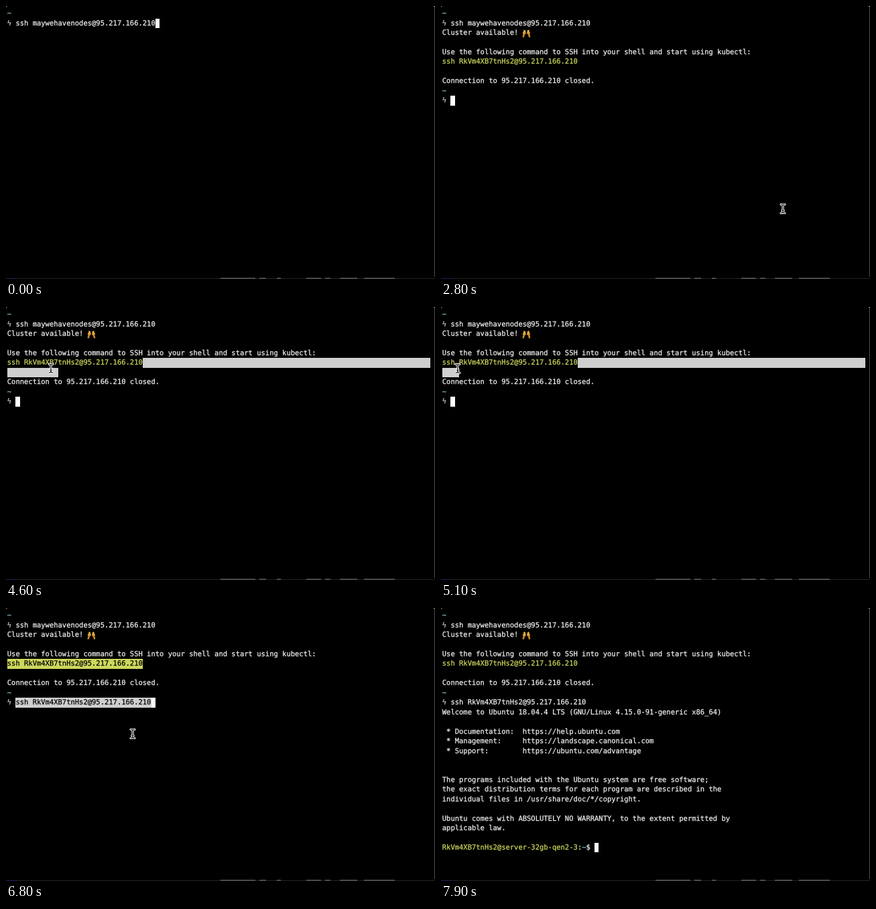
An HTML page that plays this animation: 640x408 px, repeating every 8 s.

```html
<!DOCTYPE html>
<html lang="en">
<head>
<meta charset="utf-8">
<title>Terminal</title>
<style>
  html, body { margin: 0; width: 100%; height: 100%; overflow: hidden; background: #000; }
  #stage { position: relative; width: 640px; height: 408px; overflow: hidden; }
  #term span {
    position: absolute; white-space: pre; height: 14.45px;
    font: 10.49px/15.1px "DejaVu Sans Mono", monospace;
    text-rendering: geometricPrecision;
    -webkit-text-stroke: .25px;
  }
  svg { position: absolute; left: 0; top: 0; }
</style>
</head>
<body>
<div id="stage">
  <div id="term"></div>
  <svg width="640" height="408" fill="none">
    <g stroke="#555">
      <path d="M639.5 3V405" stroke="#4c4c4c"/>
      <path d="M0 407.5H640" stroke="#242424"/>
      <path d="M0 407.5H16" stroke="#22225c"/>
      <path d="M320 407H372M378 407H388M404 407H410M448 407H470M476 407H484M498 407H524M534 407H580" stroke="#4a4a4a" stroke-width="2"/>
      <path d="M0 2V0H2M638 .5H640V3" stroke="#999"/>
    </g>
    <g id="hands" stroke-linecap="round">
      <g id="hand">
        <path d="M124 36.2V39M125.4 37V39" stroke="#eebf4c" stroke-width="1.5"/>
        <ellipse cx="124.3" cy="40.2" rx="2.4" ry="2.3" fill="#dfa53a"/>
        <path d="M123.8 42L122.8 45.6" stroke="#c88a2a" stroke-width="2.6"/>
      </g>
      <use href="#hand" transform="matrix(-1 0 0 1 254.8 0)"/>
    </g>
    <g id="mouse" stroke-linecap="round">
      <path id="beam" d="M-3-6.5Q0-6.5 0-4V4Q0 6.5-3 6.5M3-6.5Q0-6.5 0-4M0 4Q0 6.5 3 6.5M-1.2 2.5H1.2"/>
    </g>
  </svg>
</div>
<script>
const LOOP = 8000, STEP = 100;
const CELL = 6.316, ROW = 14.45, LEFT = 1.8, TOP = 4.2, COLS = 100;
const WHITE = '#f0f0f0', LIME = '#cdd75c', BLUE = '#8cc6da', PINK = '#d0bac4', GREY = '#cfcfcf';

// Event times in ms
const ENTER = 1900, REPLY = 2300, DRAG = 4000, DROP = 5700, PASTE = 6500, LOGIN = 7100, WELCOME = 7500;
const SHOW_MOUSE = 1000;

const HOST = '95.217.166.210';
const USER = 'RkVm4XB7tnHs2';
const firstCommand = 'ssh maywehavenodes@' + HOST;
const command = `ssh ${USER}@${HOST}`;
const welcome = `Welcome to Ubuntu 18.04.4 LTS (GNU/Linux 4.15.0-91-generic x86_64)

 * Documentation:  https://help.ubuntu.com
 * Management:     https://landscape.canonical.com
 * Support:        https://ubuntu.com/advantage


The programs included with the Ubuntu system are free software;
the exact distribution terms for each program are described in the
individual files in /usr/share/doc/*/copyright.

Ubuntu comes with ABSOLUTELY NO WARRANTY, to the extent permitted by
applicable law.`.split('\n');

// Pointer path: time, x, y
const path = [
  [1000, 524, 299], [1500, 522, 300], [2800, 510, 303], [3000, 496, 292],
  [3300, 340, 170], [3500, 240, 104], [3700, 207, 86], [4000, 207, 86],
  [4300, 137, 91.8], [4600, 67, 91.8], [5300, 8, 92], [5600, 4, 89.5],
  [6000, 4, 89.5], [6200, 70, 130], [6500, 175, 183], [6800, 189, 188], [8000, 189, 188]
];

const term = document.getElementById('term');
const mouse = document.getElementById('mouse');
const hands = document.getElementById('hands');
let html, last = -1;

// White outline with a thin dark core
const beam = document.getElementById('beam');
const core = beam.cloneNode();
core.id = 'core';
mouse.append(core);
for (const [part, color, width] of [[beam, '#fff', 3.2], [core, '#000', 1.1]]) {
  part.setAttribute('stroke', color);
  part.setAttribute('stroke-width', width);
}

function pointer(t) {
  const i = Math.max(1, path.findIndex(p => p[0] >= t));
  const [t0, x0, y0] = path[i - 1], [t1, x1, y1] = path[i];
  const k = Math.max(0, (t - t0) / (t1 - t0));
  return [x0 + (x1 - x0) * k, y0 + (y1 - y0) * k];
}

function put(row, col, text, color = WHITE, bg = 'none') {
  html += `<span style="left:${LEFT + col * CELL}px;top:${TOP + row * ROW}px;` +
    `width:${text.length * CELL}px;color:${color};background:${bg}">${text}</span>`;
}

const fill = (row, from, to, bg) => put(row, from, ' '.repeat(to - from), WHITE, bg);
const cursor = (row, col) => fill(row, col, col + 1, '#fff');

function prompt(row) {
  put(row, 0, '~', BLUE);
  put(row + 1, 0, 'ϟ', PINK);
}

function selection(t) {
  const end = command.length;
  const [x, y] = pointer(Math.min(t - 40, DROP));
  const col = Math.max(0, Math.round((x - LEFT) / CELL));
  if (y >= TOP + 6 * ROW) {
    fill(5, end, COLS, GREY);
    fill(6, 0, col, GREY);
  } else if (col < end) {
    put(5, col, command.slice(col), '#000', LIME);
  }
}

function draw(t) {
  html = '';
  prompt(0);
  put(1, 2, firstCommand);
  if (t < ENTER) cursor(1, 2 + firstCommand.length);
  else if (t < REPLY) cursor(2, 0);
  else {
    put(2, 0, 'Cluster available!');
    put(4, 0, 'Use the following command to SSH into your shell and start using kubectl:');
    put(5, 0, command, LIME);
    put(7, 0, `Connection to ${HOST} closed.`);
    prompt(8);
    if (t >= DRAG && t < LOGIN) selection(t);
    if (t < PASTE) cursor(9, 2);
    else if (t < LOGIN) {
      put(9, 2, command, '#000', GREY);
      cursor(9, 2 + command.length);
    } else {
      put(9, 2, command);
      if (t < WELCOME) cursor(10, 0);
    }
  }
  if (t >= WELCOME) {
    welcome.forEach((line, i) => put(10 + i, 0, line));
    const login = USER + '@server-32gb-qen2-3', n = login.length;
    put(24, 0, login, LIME);
    put(24, n, ':');
    put(24, n + 1, '~', BLUE);
    put(24, n + 2, '$');
    cursor(24, n + 4);
  }
  term.innerHTML = html;
  hands.style.display = t >= REPLY ? '' : 'none';
  mouse.style.display = t >= SHOW_MOUSE && t < LOGIN ? '' : 'none';
  mouse.setAttribute('transform', `translate(${pointer(t)})`);
}

const start = performance.now();
function tick() {
  const t = Math.floor((performance.now() - start) % LOOP / STEP) * STEP;
  if (t !== last) draw(last = t);
  requestAnimationFrame(tick);
}
tick();
</script>
</body>
</html>
```
